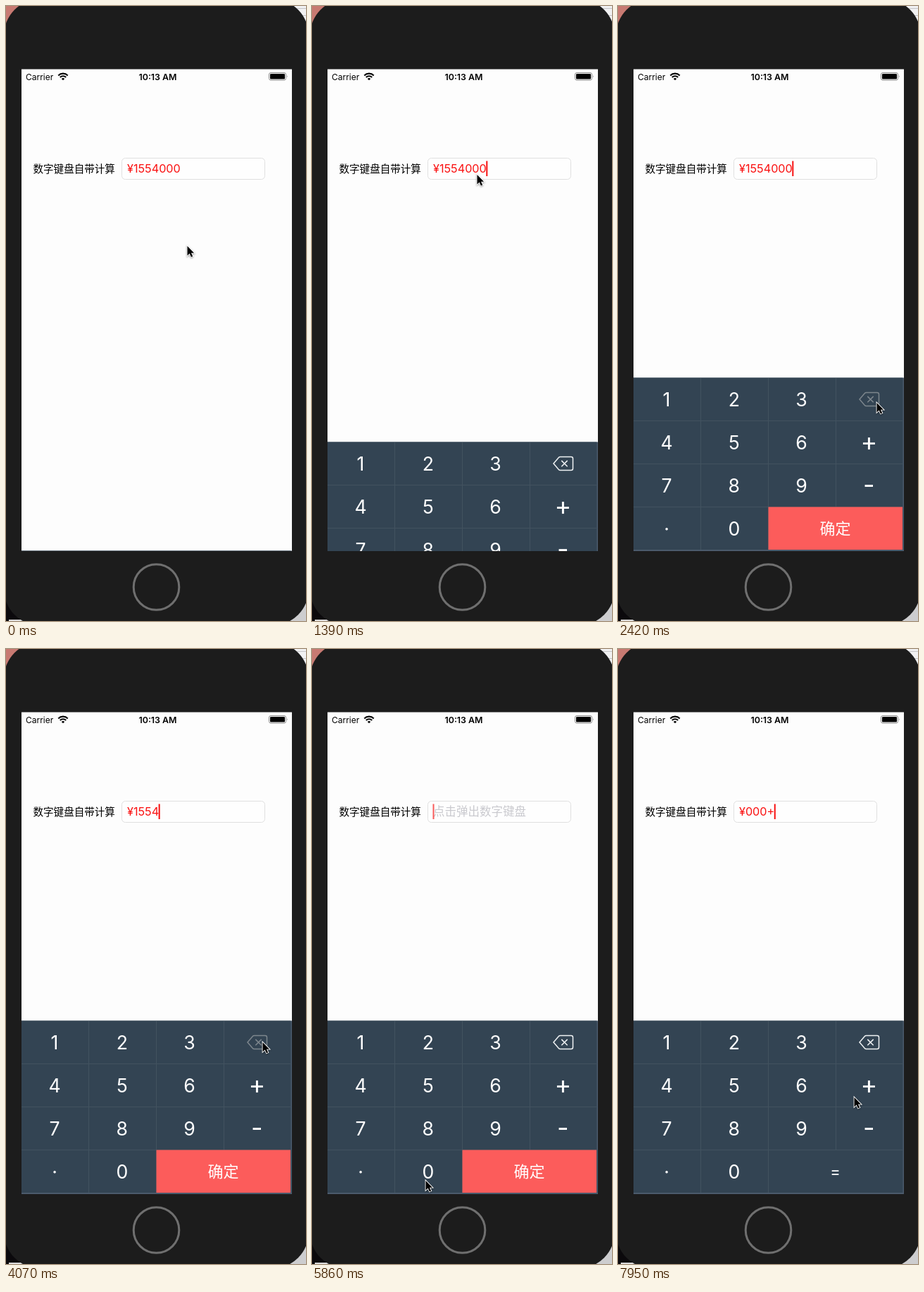
An HTML page that plays this animation: 426 px wide and 871 px high, repeating every 8 s.

```html
<!DOCTYPE html>
<html lang="zh">
<head>
<meta charset="utf-8">
<title>数字键盘</title>
<style>
  html, body { margin: 0; height: 100%; overflow: hidden; background: #1c1c1c; }
  svg { display: block; width: 100vw; height: 100vh; font-family: Inter, "Noto Sans CJK SC", "Noto Sans CJK", sans-serif; }
  .cjk { font-family: "Noto Sans CJK SC", "Noto Sans CJK", sans-serif; }
  #keyboard text { fill: #fff; text-anchor: middle; }
  #arrow { filter: drop-shadow(0 1px 1px #0006); }
</style>
</head>
<body>
<svg viewBox="0 0 426 871">
  <clipPath id="screen"><rect x="22" y="90" width="384" height="682"/></clipPath>

  <!-- desktop behind the phone -->
  <rect width="213" height="430" fill="#c87a72"/>
  <rect x="213" width="213" height="430" fill="#f1f1f2"/>
  <path d="M412 3.5h14M420 13.5h6" stroke="#c4c4c6"/>
  <rect y="430" width="213" height="441" fill="#0b090c"/>
  <rect x="213" y="430" width="213" height="441" fill="#cdcdcf"/>
  <path d="M4 870h22" stroke="#d8d8d8" stroke-width="2"/>

  <!-- phone -->
  <rect x="-3" y="-10" width="433" height="887.5" rx="52" fill="#1c1c1c"/>
  <circle cx="213.5" cy="823" r="32.3" fill="none" stroke="#6f6f6f" stroke-width="3"/>
  <rect x="22" y="89.5" width="384" height="682.5" fill="#fdfdfd"/>

  <!-- status bar -->
  <text x="28" y="104.5" font-size="12">Carrier</text>
  <text x="215.5" y="104.5" font-size="12.4" font-weight="600" text-anchor="middle">10:13 AM</text>
  <path d="M74.3 98.4a9.5 9.5 0 0 1 13.4 0M76.8 101a6 6 0 0 1 8.4 0" fill="none" stroke="#000" stroke-width="2.1"/>
  <path d="M81 105.2l-2.2-2.2a3.1 3.1 0 0 1 4.4 0z"/>
  <rect x="373.5" y="94.5" width="24" height="10.5" rx="2.5" fill="none" stroke="#8a8a8a"/>
  <rect x="375" y="96" width="21" height="7.5" rx="1.2"/>
  <path d="M399 98q1.6 1.8 0 3.6z" fill="#8a8a8a"/>

  <!-- form -->
  <text class="cjk" x="38.5" y="236.3" font-size="14.55">数字键盘自带计算</text>
  <rect x="164.5" y="215.5" width="203" height="30" rx="5" fill="#fefefe" stroke="#e0e0e0"/>
  <text id="hint" class="cjk" x="172" y="236.3" font-size="16.5" fill="#c9c9ce">点击弹出数字键盘</text>
  <text id="amount" x="172" y="236" font-size="16.2" fill="#fa1212"></text>
  <rect id="caret" y="219.5" width="2" height="21.5" fill="#f81010"/>

  <g clip-path="url(#screen)">
    <g id="keyboard">
      <rect x="22" y="-.5" width="384" height="246.5" fill="#4b5a6c"/>
      <rect x="22" y="-.5" width="382.5" height="243.5" fill="#334453"/>
      <path d="M22 60.5H404M22 121.5H404M22 182.5H404M117.5 0V243M213.5 0V243M309.5 0V182" stroke="#42525f"/>
      <rect id="confirm" x="213.5" y="182.5" width="190.5" height="60.5" fill="#fc5c5b"/>
      <g id="keys"></g>
      <text id="confirmText" x="308.5" y="221" font-size="22"></text>
      <g id="erase" fill="none" stroke-width="1.5">
        <path d="M343 30.1l7.300-8.600q.9-1 2.200-1H368q2.500 0 2.500 2.500V37q0 2.500-2.500 2.500h-15.500q-1.300 0-2.200-1z"/>
        <path d="M354.300 25.900l8.400 8.400m0-8.400l-8.400 8.400"/>
      </g>
    </g>
  </g>

  <path id="arrow" d="M.5 2v13.400l3.200-2.900 2.200 4.900 2.300-1-2.200-4.700h4z" stroke="#fff" stroke-width="1.800" paint-order="stroke"/>
</svg>
<script>
const $ = id => document.getElementById(id);
const LOOP = 8000, SAMPLE = 149, FIRST = 482;
const FOCUS = 1240, TAP = 300, BLINK = 1180;

const bursts = [
  { key: '⌫', start: 2270, taps: 1, hold: 600 },
  { key: '⌫', start: 3470, taps: 6, hold: 150 },
  { key: '0', start: 6310, taps: 3, hold: 150 },
  { key: '+', start: 7650, taps: 1, hold: 150 },
];

const moves = [
  { start: 361, end: 900, x: 234, y: 237 },
  { start: 1404, end: 1553, x: 236, y: 259 },
  { start: 1553, end: 2250, x: 367, y: 560 },
  { start: 3043, end: 3192, x: 366, y: 579 },
  { start: 3192, end: 3490, x: 364, y: 555 },
  { start: 5129, end: 5874, x: 161, y: 751 },
  { start: 7066, end: 7662, x: 335, y: 633 },
];

const clamp = v => Math.min(1, Math.max(0, v));
const ease = v => v * v * (3 - 2 * v);

// Replays the taps up to time t; a key takes effect on release
function typedAt(t) {
  let amount = '1554000', edited = FOCUS, erasing = false;
  for (const { key, start, taps, hold } of bursts) {
    for (let i = 0; i < taps; i++) {
      const press = start + i * TAP, release = press + hold;
      if (t >= release) {
        amount = key === '⌫' ? amount.slice(0, -1) : amount + key;
        edited = release;
      } else if (t >= press && key === '⌫') erasing = true;
    }
  }
  return { amount: amount && '¥' + amount, edited, erasing };
}

function pointerAt(t) {
  let x = 257, y = 338;
  for (const move of moves) {
    const f = ease(clamp((t - move.start) / (move.end - move.start)));
    x += (move.x - x) * f;
    y += (move.y - y) * f;
  }
  return [x, y];
}

[...'123 456+789-·0'].forEach((label, i) => {
  const key = document.createElementNS('http://www.w3.org/2000/svg', 'text');
  const sign = '+-'.includes(label);
  key.textContent = label;
  key.setAttribute('x', 69 + i % 4 * 95.8);
  key.setAttribute('y', (i >> 2) * 61 + (sign ? 42.3 : 40));
  key.setAttribute('font-size', sign ? 36 : 26.7);
  $('keys').append(key);
});

function draw(now) {
  // The screen is sampled at a fixed low rate
  const t = Math.max(0, 510 + SAMPLE * Math.floor((now % LOOP - FIRST) / SAMPLE));
  const { amount, edited, erasing } = typedAt(t);
  const sum = amount.includes('+');

  $('amount').textContent = amount;
  $('hint').style.display = amount ? 'none' : '';
  $('caret').setAttribute('x', 171.5 + (amount ? $('amount').getComputedTextLength() : 0));
  $('caret').style.opacity = t < FOCUS ? 0 : clamp((890 - (t - edited) % BLINK) / 200);

  const top = 527 + 245 * Math.exp(-Math.max(0, t - 1350) / 54.7);
  $('keyboard').setAttribute('transform', `translate(0 ${Math.round(top)})`);
  $('erase').setAttribute('stroke', erasing ? '#7d868d' : '#eef1f3');
  $('confirm').style.display = sum ? 'none' : '';
  $('confirmText').textContent = sum ? '=' : '确定';

  $('arrow').setAttribute('transform', `translate(${pointerAt(t)})`);
  requestAnimationFrame(draw);
}
requestAnimationFrame(draw);
</script>
</body>
</html>
```
